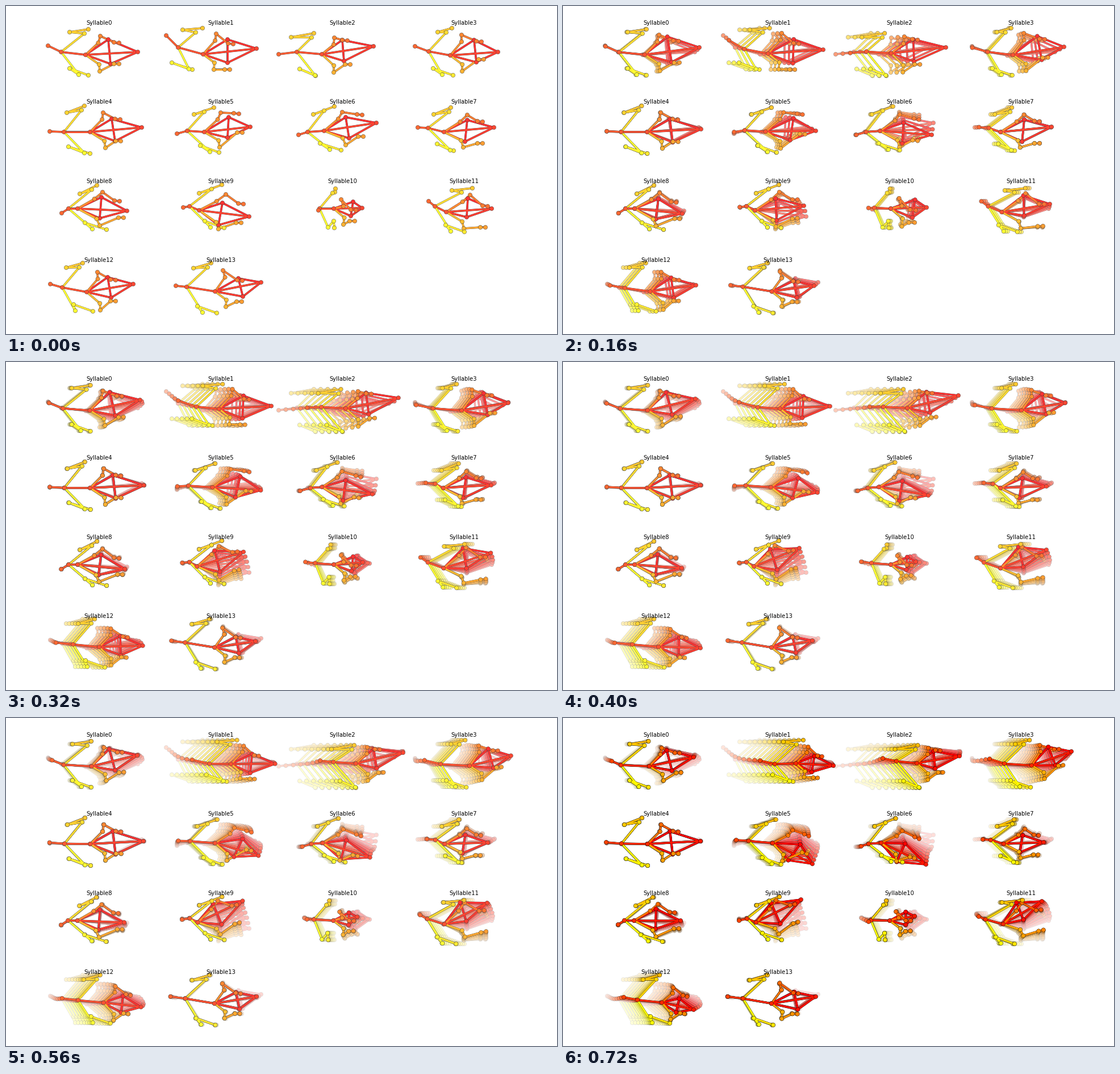
Animation, 970 px wide and 578 px high, one loop 800 ms. Source, as a matplotlib script:

```python
import numpy as np
import matplotlib.pyplot as plt
from matplotlib.animation import FuncAnimation
from matplotlib.collections import LineCollection
from matplotlib.patches import Rectangle

W, H, DPI = 970, 578, 64
PX = 72 / DPI  # points per pixel
STEPS, INTERVAL, FADE = 10, 80, 0.2

# Joint order: ears, nose, shoulders, hips, tail, then each limb from tip to body
LIMBS = [range(6, 10), range(10, 14), range(14, 17), range(17, 20)]
ROOTS = [3, 3, 4, 4]
EDGES = [(0, 1), (0, 2), (1, 2), (0, 3), (1, 3), (2, 3), (3, 4), (4, 5)]
for limb, root in zip(LIMBS, ROOTS):
    chain = [*limb, root]
    EDGES += zip(chain, chain[1:])
COLORS = plt.get_cmap("autumn")(np.linspace(0, 1, 20))

tracks = []


def points(values):
    """Flat x, y list to complex points."""
    return np.array(values[::2]) + 1j * np.array(values[1::2])


def path(shifts):
    """Smooth shift at every step, starting from rest."""
    times = [0, 2, 5, 9] if len(shifts) == 3 else [0, 5, 9]
    keys = np.array([0, *shifts])
    slopes = np.gradient(keys, times)
    out = []
    for step in range(STEPS):
        i = min(np.searchsorted(times, step, "right") - 1, len(times) - 2)
        span = times[i + 1] - times[i]
        u = (step - times[i]) / span
        ease = u * u * (3 - 2 * u)
        out.append(keys[i] * (1 - ease) + keys[i + 1] * ease
                   + span * u * (1 - u) * ((1 - u) * slopes[i] - u * slopes[i + 1]))
    return np.array(out)[:, None]


def foreleg(tip, elbow, shoulder, side):
    """Tip, wrist, elbow and upper arm; side is -1 above the body, 1 below."""
    reach = (elbow - shoulder).real
    bend = 12 - 0.6 * reach if side < 0 else 7 - 0.32 * reach
    wrist = tip - 9 - (1j if side < 0 else 0)
    return [tip, wrist, elbow, elbow + bend - side * 12j]


def syllable(body, paws, hind, nose, spine, tail):
    """body, paws, hind: rest pose. nose, spine, tail: shifts over the loop."""
    *ears, n0, s0, b0, t0 = points(body)
    up_tip, up_elbow, low_tip, low_elbow = points(paws)
    ux, uy, ax_, ay, knee, toe, ankle, lx, ly = hind
    hind0 = points([ux, uy, ax_, ay, knee, uy + 7.5, toe, ly + 1, ankle, ly - 11, lx, ly])
    fore0 = np.array(foreleg(up_tip, up_elbow, s0, -1) + foreleg(low_tip, low_elbow, s0, 1))

    dt = path(points(tail))
    db = path(spine[2:])
    n = n0 + path(points(nose))
    s = s0 + path(spine[:2]) * (1 - 0.08j)
    turn = (n - s) / (n0 - s0)  # head rotation and foreshortening
    pose = np.hstack([
        s + (np.array(ears) - s0) * turn, n, s,
        b0 + db + 0.35j * dt.imag, t0 + dt,
        s + (fore0 - s0) * (1 + turn) / 2,
        hind0 + 1.1 * db,
    ])
    tracks.append(np.stack([pose.real, pose.imag], axis=-1))


syllable([180, 59, 184, 102, 232, 81, 140, 86, 97, 81, 74, 70],
         [199, 65, 166, 53, 199, 102, 165, 115],
         [145, 41, 112, 46, 138, 145, 112, 128, 121],
         [8, -8, 1, -16, -2, -12], [9, 12, 4, 5], [3, 3, 12, 6])
syllable([390, 59, 390, 100, 441, 75, 347, 85, 303, 73, 282, 52],
         [400, 67, 370, 49, 394, 112, 366, 112],
         [346, 39, 311, 42, 334, 328, 292, 322, 111],
         [17, 2, 29, 3, 35, 9], [35, 63, 40, 70], [28, 19, 65, 23])
syllable([592, 60, 595, 97, 647, 71, 556, 85, 512, 81, 480, 85],
         [601, 61, 578, 56, 606, 103, 577, 117],
         [542, 48, 502, 55, 538, 545, 517, 544, 122],
         [27, 2, 49, -12, 51, -4], [50, 67, 52, 75], [60, -6, 83, -14])
syllable([824, 60, 828, 99, 866, 81, 782, 87, 744, 80, 720, 71],
         [837, 63, 802, 51, 841, 94, 803, 115],
         [785, 39, 760, 46, 775, 787, 752, 768, 121],
         [16, -9, 18, -9, 29, -22], [25, 43, 11, 33], [5, 5, 31, 1])
syllable([186, 199, 192, 238, 239, 214, 148, 222, 102, 222, 77, 221],
         [201, 200, 171, 188, 202, 238, 175, 250],
         [138, 176, 107, 188, 133, 148, 110, 138, 259],
         [4, 3, 3, 3, 3, 3], [0, 1, 1, 1], [0, -1, -1, -2])
syllable([392, 196, 390, 232, 430, 213, 349, 222, 319, 220, 301, 225],
         [410, 190, 378, 188, 416, 223, 376, 249],
         [366, 179, 331, 191, 349, 375, 342, 359, 257],
         [15, 7, 18, 17, 9, 44], [17, 20, 3, 8], [1, -7, 4, -10])
syllable([598, 196, 604, 233, 652, 206, 560, 220, 531, 222, 515, 227],
         [627, 192, 592, 187, 629, 230, 598, 245],
         [578, 177, 541, 191, 560, 590, 553, 570, 253],
         [-3, 21, -9, 29, -13, 52], [-4, 0, 6, 7], [4, 0, 10, -1])
syllable([812, 201, 808, 239, 859, 214, 771, 222, 743, 215, 725, 214],
         [839, 204, 812, 192, 839, 242, 805, 249],
         [783, 179, 753, 191, 780, 788, 759, 782, 254],
         [1, -1, -8, 5, -13, 5], [-1, 5, 14, 10], [16, -1, 14, 0])
syllable([168, 337, 165, 374, 213, 361, 126, 357, 110, 357, 98, 365],
         [200, 344, 170, 328, 207, 373, 165, 387],
         [160, 316, 130, 331, 151, 177, 139, 152, 393],
         [-3, 5, -4, 2, -6, -4], [0, -1, 0, -2], [-1, 0, -1, -1])
syllable([381, 347, 374, 386, 428, 371, 340, 360, 323, 353, 312, 355],
         [418, 349, 387, 332, 414, 382, 374, 393],
         [380, 315, 340, 330, 362, 384, 350, 360, 390],
         [-4, -19, -12, -43, -9, -51], [-4, 0, 0, 1], [-2, -1, -2, 2])
syllable([611, 345, 607, 370, 627, 356, 577, 357, 552, 357, 550, 360],
         [616, 360, 590, 341, 614, 379, 594, 385],
         [580, 322, 579, 328, 575, 578, 577, 567, 390],
         [13, -1, -6, -4, -8, -7], [0, -2, -9, -10], [-25, -8, -12, -1])
syllable([813, 339, 811, 372, 855, 357, 775, 363, 755, 353, 744, 344],
         [848, 353, 817, 333, 844, 390, 806, 392],
         [821, 321, 785, 325, 802, 807, 774, 783, 397],
         [2, -8, -4, -26, -12, -34], [-5, 0, -14, -11], [-16, 1, -12, 6])
syllable([179, 478, 185, 514, 224, 490, 142, 504, 99, 496, 78, 490],
         [193, 483, 161, 469, 193, 520, 166, 536],
         [135, 453, 106, 461, 129, 153, 119, 122, 537],
         [10, 2, 18, 14, 6, 24], [26, 32, 23, 32], [13, 5, 29, 2])
syllable([409, 480, 417, 512, 449, 487, 368, 503, 318, 495, 299, 493],
         [416, 484, 382, 466, 415, 521, 387, 530],
         [361, 453, 330, 462, 355, 371, 337, 346, 540],
         [-7, 6, -10, 4, -4, 4], [-1, -1, -3, -1], [-9, -2, -9, -2])

fig = plt.figure(figsize=(W / DPI, H / DPI), dpi=DPI, facecolor="white")
ax = fig.add_axes([0, 0, 1, 1])
ax.set(xlim=(0, W), ylim=(H, 0))
ax.axis("off")


def draw_step(step):
    """Draw every skeleton at one step, then a veil that fades all before it."""
    z = 4 * step
    segments = [track[step][list(edge)] for track in tracks for edge in EDGES]
    tints = [COLORS[a] for _ in tracks for a, _ in EDGES]
    joints = np.concatenate([track[step] for track in tracks])
    artists = [
        ax.add_collection(LineCollection(segments, colors="k", lw=3.5 * PX, zorder=z)),
        ax.add_collection(LineCollection(segments, colors=tints, lw=3 * PX, zorder=z + 1)),
        ax.scatter(*joints.T, s=(7.2 * PX) ** 2, c=np.tile(COLORS, (len(tracks), 1)),
                   edgecolors="k", linewidths=0.45 * PX, zorder=z + 2),
    ]
    if step < STEPS - 1:
        artists.append(ax.add_patch(Rectangle((0, 0), W, H, fc="white", ec="none",
                                              alpha=FADE, zorder=z + 3)))
    return artists


layers = [draw_step(step) for step in range(STEPS)]

for n in range(len(tracks)):
    row, col = divmod(n, 4)
    ax.text(163.8 + 214.2 * col, 33.3 + 139.1 * row, f"Syllable{n}", ha="center",
            va="baseline", fontsize=10 * PX, family="DejaVu Sans", zorder=4 * STEPS)


def update(frame):
    for step, artists in enumerate(layers):
        for artist in artists:
            artist.set_visible(step <= frame)
    return []


anim = FuncAnimation(fig, update, frames=STEPS, interval=INTERVAL,
                     init_func=lambda: update(0), repeat=True, repeat_delay=0)
plt.show()
```
